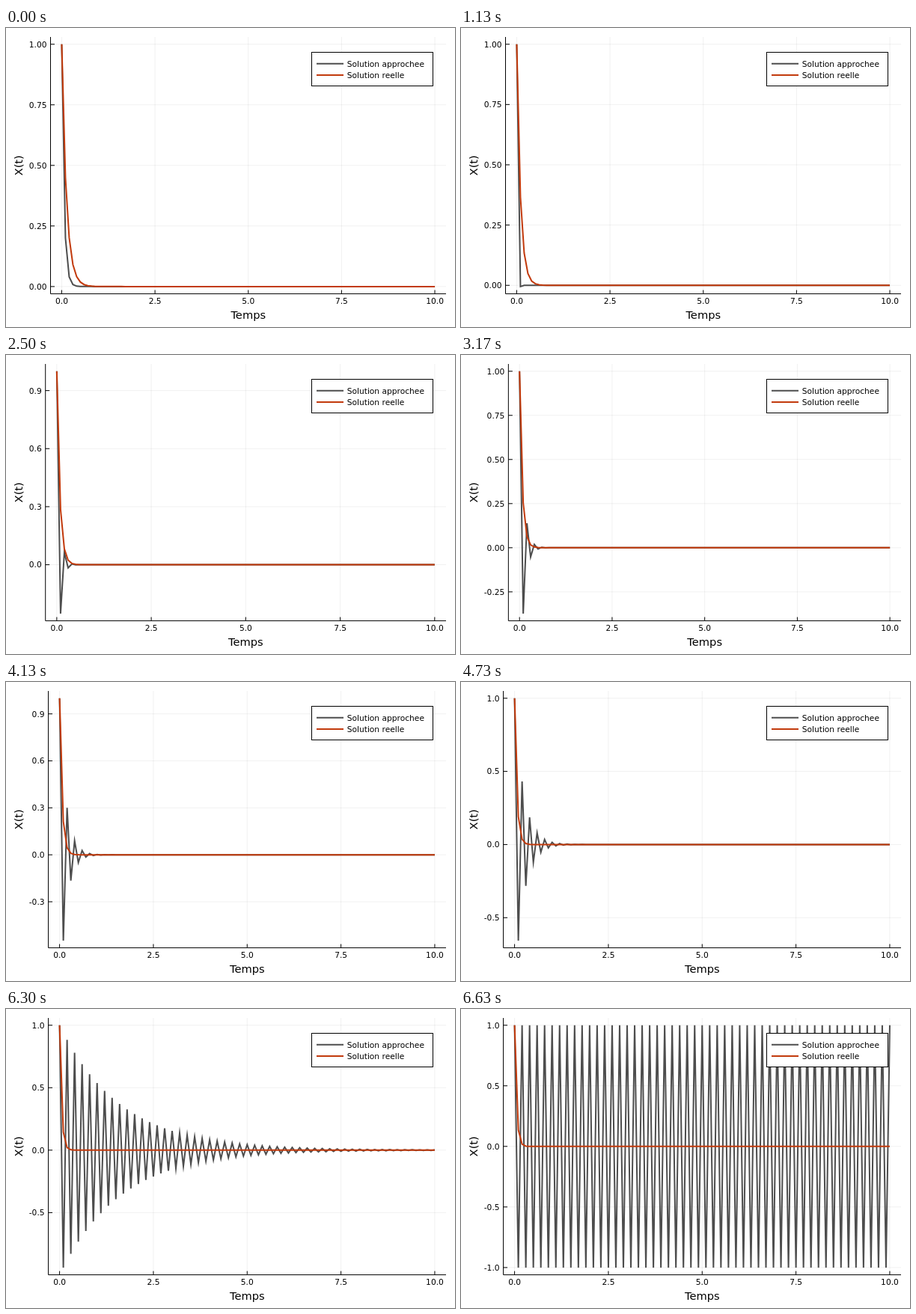
Recreate the animation shown at these times as an HTML page with a canvas. Size 600 by 400 pixels, loop 6.66 s.

```html
<!DOCTYPE html>
<html lang="fr">
<head>
<meta charset="utf-8">
<style>
html, body { margin: 0; width: 100%; height: 100%; overflow: hidden; background: #fff; }
canvas { display: block; }
</style>
</head>
<body>
<canvas id="stage" width="600" height="400"></canvas>
<script>
const ctx = document.getElementById('stage').getContext('2d');
const LOOP = 6660, LAST = 199;
const TOP = 12, BOTTOM = 355.6, RIGHT = 588;
const GRAY = '#4d4d4d', RED = '#c23a0c', GRID = 'rgba(0,0,0,.06)';
const SMALL = 10.667, LARGE = 14.667;

function text(s, x, y, size, align) {
  ctx.font = `${size}px "DejaVu Sans", sans-serif`;
  ctx.textAlign = align;
  ctx.fillStyle = '#000';
  ctx.fillText(s, x, y);
}

function stroke(points, color, width) {
  ctx.strokeStyle = color;
  ctx.lineWidth = width;
  ctx.beginPath();
  points.forEach(p => ctx.lineTo(...p));
  ctx.stroke();
}

// Tick spacing grows as the vertical range widens.
function tickStep(n) {
  if (n < 69) return 0.25;
  if (n < 77) return 0.3;
  if (n < 93) return 0.2;
  if (n < 103) return 0.25;
  return n < 125 ? 0.3 : 0.5;
}

function legend() {
  ctx.fillStyle = '#fff';
  ctx.fillRect(408.5, 32.5, 162, 45);
  ctx.strokeStyle = '#000';
  ctx.lineWidth = 1;
  ctx.strokeRect(408.5, 32.5, 162, 45);
  [['Solution approchee', GRAY], ['Solution reelle', RED]].forEach(([name, color], i) => {
    const y = 47.8 + 15.1 * i;
    stroke([[415, y], [451, y]], color, 2);
    text(name, 455.7, y + 4, SMALL, 'left');
  });
}

function draw(n) {
  const rate = 8 + 12 * n / LAST;
  const factor = 1 - rate / 10; // explicit Euler with a time step of 0.1
  const low = Math.min(0, factor), pad = 0.03 * (1 - low);
  const yMin = low - pad, yMax = 1 + pad;

  const step = tickStep(n), digits = step === 0.25 ? 2 : 1;
  const ticks = [];
  for (let i = Math.ceil(yMin / step); i * step <= yMax; i++) ticks.push(i * step);
  const hasMinus = ticks[0] < 0;
  const labelWidth = SMALL * (0.954 + 0.636 * digits + (hasMinus ? 0.361 : 0));
  const left = 35.75 + labelWidth;

  const px = t => left + (t + 0.3) / 10.6 * (RIGHT - left);
  const py = v => BOTTOM - (v - yMin) / (yMax - yMin) * (BOTTOM - TOP);

  ctx.fillStyle = '#fff';
  ctx.fillRect(0, 0, 600, 400);

  const times = [0, 2.5, 5, 7.5, 10];
  times.forEach(t => stroke([[px(t), TOP], [px(t), BOTTOM]], GRID, 1));
  ticks.forEach(v => stroke([[left, py(v)], [RIGHT, py(v)]], GRID, 1));

  stroke([[left, BOTTOM], [RIGHT, BOTTOM]], '#000', 1);
  stroke([[left, TOP], [left, BOTTOM]], '#000', 1);
  times.forEach(t => {
    stroke([[px(t), BOTTOM], [px(t), BOTTOM - 5]], '#000', 1);
    text(t.toFixed(1), px(t), 369, SMALL, 'center');
  });
  ticks.forEach(v => {
    stroke([[left, py(v)], [left + 5.5, py(v)]], '#000', 1);
    text(v.toFixed(digits), left - 5, py(v) + 3.9, SMALL, 'right');
  });

  text('Temps', (left + RIGHT) / 2, 389, LARGE, 'center');
  ctx.save();
  ctx.translate(21.5, (TOP + BOTTOM) / 2);
  ctx.rotate(-Math.PI / 2);
  text('X(t)', 0, 0, LARGE, 'center');
  ctx.restore();

  const curve = f => Array.from({ length: 101 }, (_, i) => [px(i / 10), py(f(i))]);
  stroke(curve(i => factor ** i), GRAY, 2);
  stroke(curve(i => Math.exp(-rate * i / 10)), RED, 2);
  legend();
}

const start = performance.now();
function tick() {
  const t = Math.max(0, performance.now() - start) % LOOP;
  // 30 pictures a second, timed in whole hundredths
  draw(Math.floor((Math.floor(t / 10) * 10 + 5) * 0.03));
  requestAnimationFrame(tick);
}
tick();
</script>
</body>
</html>
```
